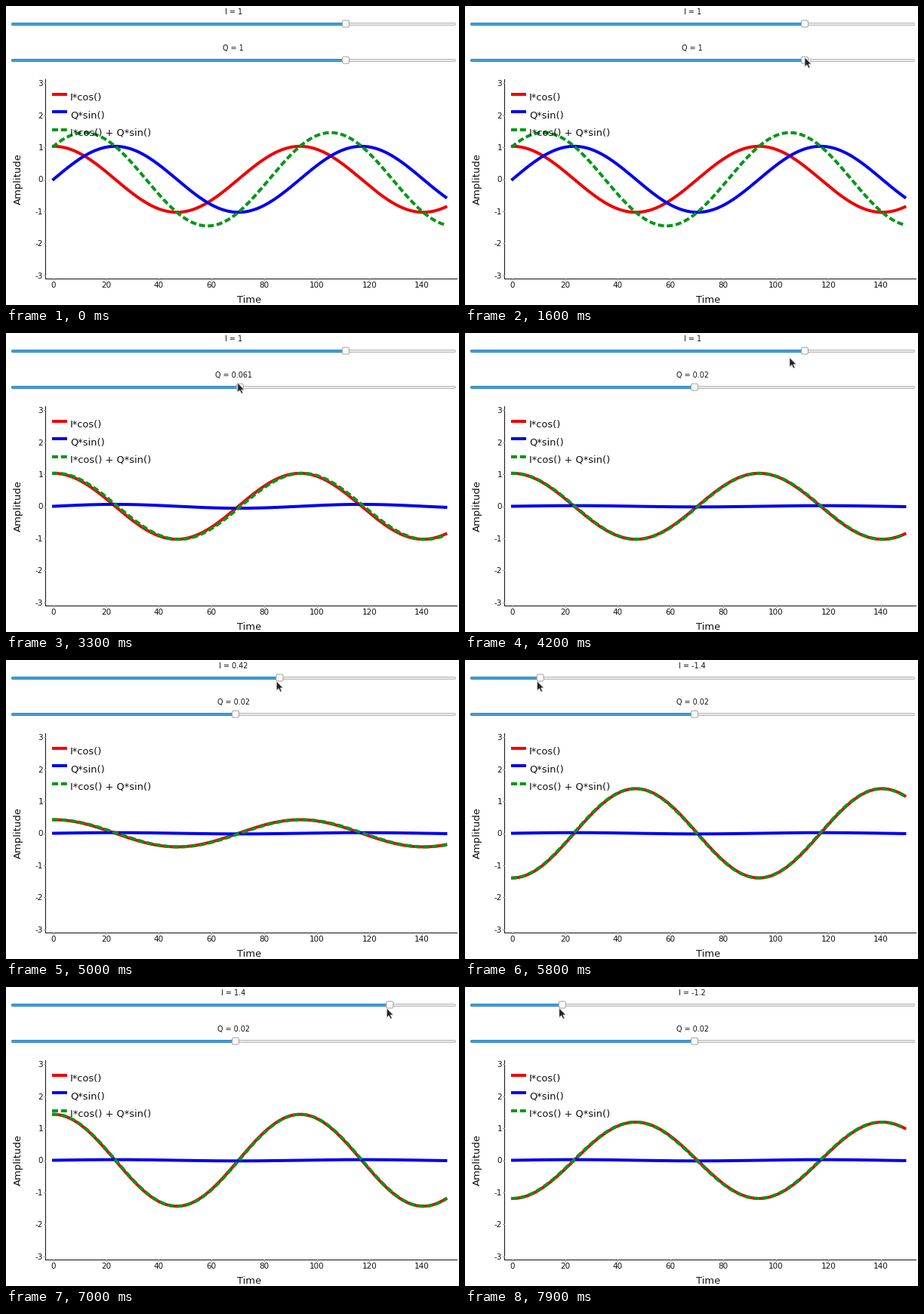
A matplotlib script that plays this animation: 600x396 px, repeating every 8 s.

```python
import numpy as np
import matplotlib.pyplot as plt
from matplotlib.animation import FuncAnimation
from matplotlib.patches import FancyBboxPatch, Polygon

W, H, DPI = 600, 396, 72          # at 72 dpi one point is one pixel
FRAMES, STEP = 80, 100
X0, DX = 63, 3.486                # plot origin and pixels per unit
Y0, DY = 229.5, 42.4
LEFT, BOTTOM = 52, 361            # axis lines
RED, BLUE, GREEN = '#f00000', '#0000f0', '#009619'
DOTS = (0, (1, 1.94))             # in line widths, before the square caps
INK, TICK = '#111111', '#999999'

plt.rcParams['font.family'] = 'DejaVu Sans'
fig = plt.figure(figsize=(W / DPI, H / DPI), dpi=DPI, facecolor='white')
ax = fig.add_axes([0, 0, 1, 1])
ax.set(xlim=(0, W), ylim=(H, 0))
ax.axis('off')


def line(x, y, color, width, **kw):
    return ax.plot(x, y, color=color, lw=width, **kw)[0]


def text(x, y, s, size, ha='center', va='baseline', **kw):
    return ax.text(x, y, s, fontsize=size, ha=ha, va=va, color=INK, **kw)


def slider_x(v):
    return 301.1 + 144.5 * v


class Slider:
    def __init__(self, name, y):
        self.name = name
        self.label = text(301.3, y - 12.7, '', 9.6)
        for color, width in (('#b9b9b9', 4), ('#e9e9e9', 2)):
            line([9, 594], [y, y], color, width, solid_capstyle='round')
        self.fill = [line([9, 9], [y, y], color, width, solid_capstyle='round')
                     for color, width in (('#2f7fb5', 4), ('#3fa3e0', 2.2))]
        self.knob = FancyBboxPatch((0, y - 4.5), 9, 9, fc='#fbfbfb', ec='#a3a3a3', lw=1,
                                   boxstyle='round,pad=0,rounding_size=2', zorder=5)
        ax.add_patch(self.knob)

    def set(self, v):
        x = slider_x(v)
        self.label.set_text(f'{self.name} = {v:.2g}')
        for bar in self.fill:
            bar.set_xdata([9, x])
        self.knob.set_x(x - 4.5)


def snap(v):
    """Nearest of 100 slider stops from -2 to 2."""
    return (np.round(v * 99 / 4 - .5) + .5) * 4 / 99


def ease(t, t0, t1, a, b):
    u = np.clip((t - t0) / (t1 - t0), 0, 1)
    return a + (b - a) * (1 - np.cos(np.pi * u)) / 2


def swing(t, turns):
    """Half-cosine motion through (time, value) turning points."""
    v = turns[0][1]
    for (t0, a), (t1, b) in zip(turns, turns[1:]):
        if t > t0:
            v = ease(t, t0, t1, a, b)
    return v


I_TURNS = [(4520, 1.03), (5993, -1.5), (6853, 1.55), (7971, -1.22)]
Q_TURNS = [(1650, 1.03), (2270, -1.4), (2850, 1.5), (3353, .02)]


def pointer(t, i, q):
    """Come in from below, drag Q, go up to I, drag I."""
    if t <= 1650:
        return ease(t, 150, 1500, 360, 450), ease(t, 150, 1500, 400, 68)
    if t <= 3500:
        return slider_x(q) - 3, 66
    if t <= 4520:
        return ease(t, 3500, 4400, 301, 447), ease(t, 3500, 4400, 66, 28)
    return slider_x(i) - 4, 28


# Axes
line([LEFT, LEFT], [97, BOTTOM], INK, 1)
line([LEFT, 597], [BOTTOM, BOTTOM], INK, 1)
for v in range(-3, 4):
    y = Y0 - DY * v
    line([LEFT - 2, LEFT], [y, y], TICK, 1)
    text(49, y + 3.9, str(v), 10.4, ha='right')
for v in range(0, 141, 20):
    x = X0 + DX * v
    line([x, x], [BOTTOM, BOTTOM + 2], TICK, 1)
    text(x, 372.8, str(v), 10.4)
text(321.8, 392.8, 'Time', 13)
text(16, 229.3, 'Amplitude', 13.1, va='center', rotation=90)

# Curves and legend
phase = np.linspace(0, 10, 150)
xs = X0 + DX * np.arange(150)
curves = []
for k, (color, style, name) in enumerate([(RED, '-', 'I*cos()'), (BLUE, '-', 'Q*sin()'),
                                          (GREEN, DOTS, 'I*cos() + Q*sin()')]):
    look = dict(ls=style, solid_capstyle='projecting', dash_capstyle='projecting')
    curves.append(line(xs, xs, color, 4, zorder=3, **look))
    y = 117 + 23.4 * k
    line([63, 79], [y, y], color, 4, zorder=4, **look)
    text(85, y + 7.6, name, 13, ha='left', zorder=5)

sliders = Slider('I', 23.5), Slider('Q', 71.7)
ARROW = np.array([(0, 0), (0, 12.5), (2.9, 9.8), (5, 14.3), (7, 13.4), (5, 9), (8.8, 9)])
cursor = Polygon(ARROW, fc='#222222', ec='#d8d8d8', lw=.8, zorder=9)
ax.add_patch(cursor)


def update(n):
    t = n * STEP
    i_hand, q_hand = swing(t, I_TURNS), swing(t, Q_TURNS)
    i, q = snap(i_hand), snap(q_hand)
    for slider, v in zip(sliders, (i, q)):
        slider.set(v)
    a, b = i * np.cos(phase), q * np.sin(phase)
    for curve, v in zip(curves, (a, b, a + b)):
        curve.set_ydata(Y0 - DY * v)
    cursor.set_xy(ARROW + pointer(t, i_hand, q_hand))
    return curves


anim = FuncAnimation(fig, update, frames=FRAMES, interval=STEP, repeat=True, repeat_delay=0)
plt.show()
```
